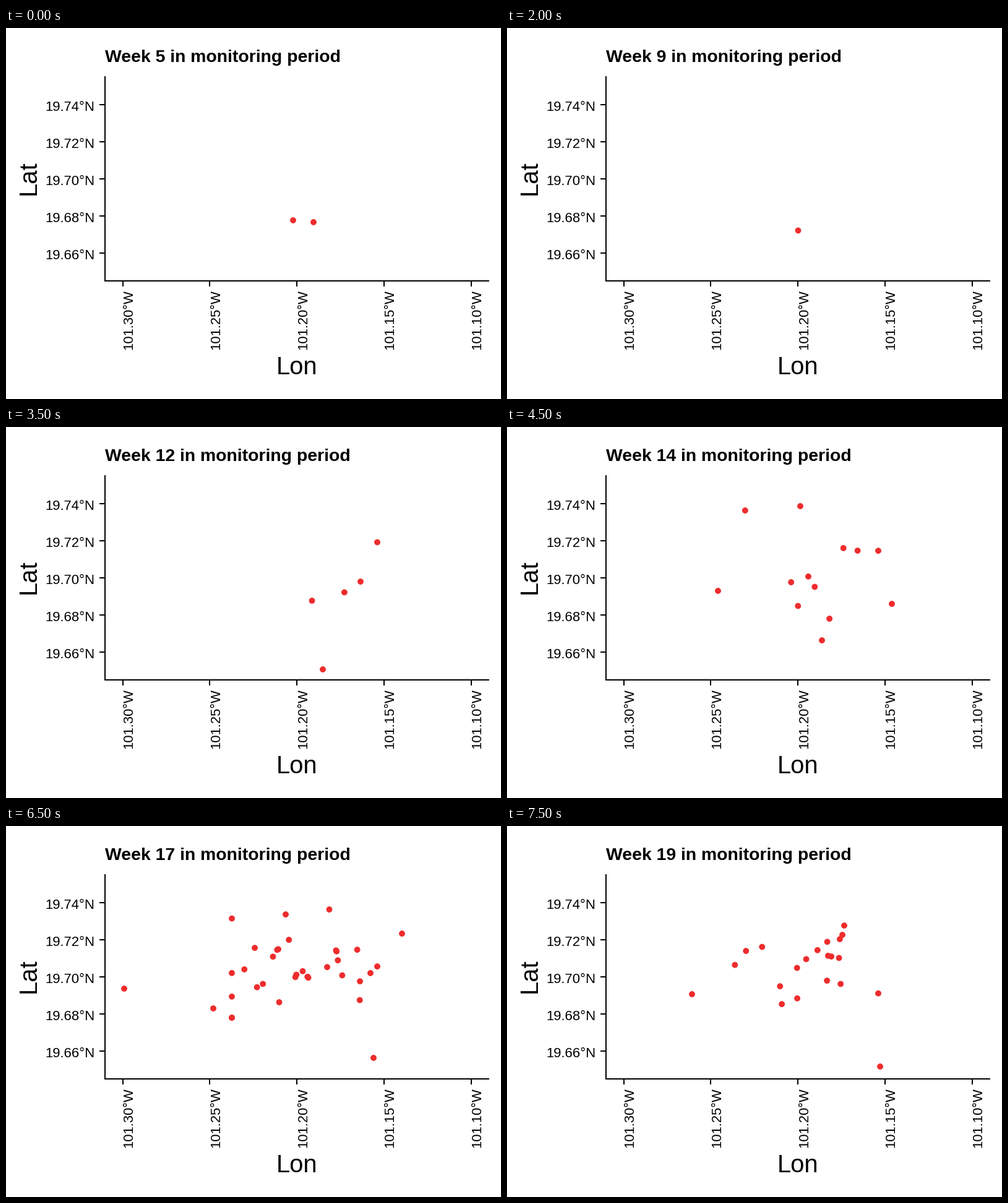
These frames come from a looping animation (800 px wide and 600 px high, 8000 ms). A matplotlib script:

```python
import numpy as np
import matplotlib.pyplot as plt
from matplotlib.animation import FuncAnimation
from matplotlib.colors import to_rgba

W, H, DPI = 800, 600, 100
PT = 72 / DPI  # points per pixel
FRAMES, INTERVAL = 16, 500
RED = "#EE2C2C"
plt.rcParams["font.family"] = "Liberation Sans"

fig = plt.figure(figsize=(W / DPI, H / DPI), dpi=DPI, facecolor="white")
ax = fig.add_axes([0, 0, 1, 1])
ax.set_xlim(0, W)
ax.set_ylim(H, 0)
ax.axis("off")


def line(x0, y0, x1, y1):
    ax.plot([x0, x1], [y0, y1], color="black", lw=2 * PT, solid_capstyle="butt")


def label(x, y, text, px, **kw):
    return ax.text(x, y, text, fontsize=px * PT, color="black", ha="left",
                   va="baseline", rotation_mode="anchor", **kw)


# Axes, ticks and labels
line(160, 78, 160, 410)
line(159, 409, 781, 409)
for i in range(5):
    y = 124.4 + 60 * i
    line(151, y, 160, y)
    label(63.2, y + 9.4, f"{19.74 - 0.02 * i:.2f}°N", 22.2)
    x = 188.7 + 140.72 * i
    line(x, 409, x, 418)
    label(x + 16, 520.5, f"{101.30 - 0.05 * i:.2f}°W", 22, rotation=90)
label(436.6, 560, "Lon", 40)
label(48, 269.5, "Lat", 40, rotation=90)
title = label(160, 55, "", 28.45, weight="bold")

dots = ax.scatter([], [], s=(8.8 * PT) ** 2, linewidths=PT, zorder=3)


def cloud(week, n, *outer):
    """Outer points followed by n seeded ones scattered around the city."""
    pts = np.random.default_rng(week).normal((495, 237), (70, 42), (n, 2))
    pts = np.clip(pts, (365, 135), (600, 310))
    return np.vstack([np.array(outer, float), pts])


# Weeks 6 and 7 have no sightings, so the dots glide from week 5 to week 8.
SIGHTINGS = {
    5: cloud(5, 0, (464, 311), (497, 314)),
    8: cloud(8, 0, (548, 272)),
    9: cloud(9, 0, (470, 327)),
    10: cloud(10, 0, (482, 179)),
    11: cloud(11, 1, (557, 304)),
    12: cloud(12, 3, (573, 250), (512, 392)),
    13: cloud(13, 7, (641, 232)),
    14: cloud(14, 9, (341, 265), (474, 128), (622, 286), (509, 345)),
    15: cloud(15, 9, (290, 273), (257, 190), (470, 102), (472, 210)),
    16: cloud(16, 15, (190, 263), (453, 210), (380, 232), (670, 256),
              (500, 375)),
    17: cloud(17, 30, (191, 263), (335, 295), (452, 143), (640, 174),
              (594, 375)),
    18: cloud(18, 23, (253, 262), (717, 240), (560, 388)),
    19: cloud(19, 18, (299, 272), (545, 161), (603, 389)),
}


def scene(week):
    """Dots at a fractional week: shared ones move, the others fade."""
    a = max(w for w in SIGHTINGS if w <= week)
    b = min((w for w in SIGHTINGS if w > a), default=a + 1)
    old, new = SIGHTINGS[a], SIGHTINGS.get(b, SIGHTINGS[a])
    u = (week - a) / (b - a)
    if u == 0:
        return old, np.ones(len(old))
    n = min(len(old), len(new))
    pts = np.vstack([old[:n] + u * (new[:n] - old[:n]), old[n:], new[n:]])
    alphas = np.repeat([1, 1 - u, u], [n, len(old) - n, len(new) - n])
    return pts, alphas


def update(i):
    # One week per step, half a week between weeks 15 and 16
    week = np.interp(i, [0, 10, 12, 15], [5, 15, 16, 19])
    title.set_text(f"Week {int(week)} in monitoring period")
    pts, alphas = scene(week)
    colors = [to_rgba(RED, a) for a in alphas]
    dots.set_offsets(pts)
    dots.set_facecolor(colors)
    dots.set_edgecolor(colors)
    return title, dots


anim = FuncAnimation(fig, update, frames=FRAMES, interval=INTERVAL,
                     repeat=True, repeat_delay=0, blit=False)
plt.show()
```
